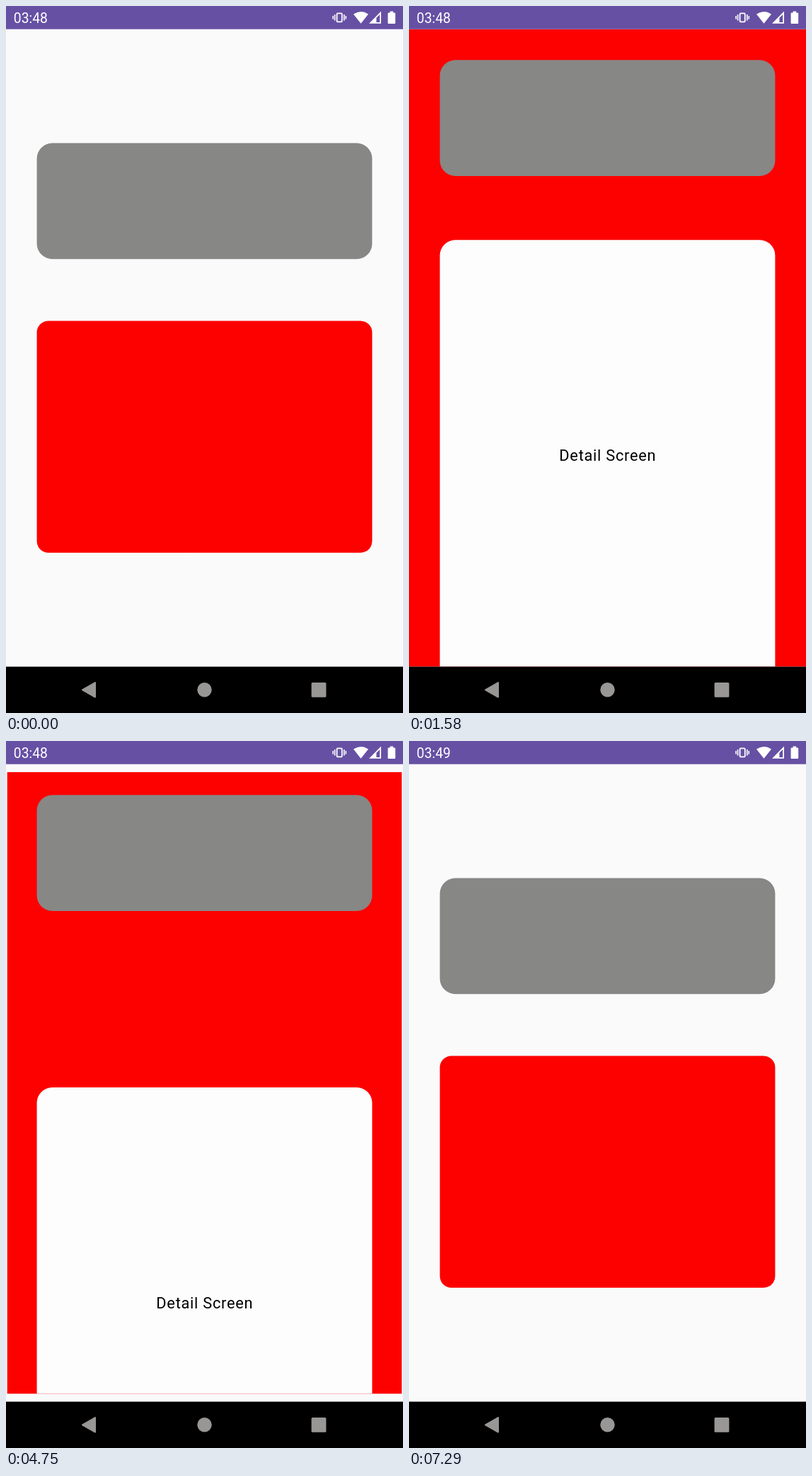
Animation, 561 px wide and 998 px high, one loop 7.71 s. Source, as an HTML page:

```html
<!DOCTYPE html>
<html lang="en">
<head>
<meta charset="utf-8">
<title>Card to detail transition</title>
<style>
  html, body { margin: 0; width: 100%; height: 100%; overflow: hidden; background: #fafafb; }
  svg { display: block; width: 100%; height: 100%; }
  text { font-family: Roboto, sans-serif; }
</style>
</head>
<body>
<svg viewBox="0 0 561 998">
  <defs>
    <clipPath id="cardClip"><rect id="clipBox"/></clipPath>
  </defs>
  <rect width="561" height="998" fill="#fafafb"/>
  <rect id="card" fill="#fd0000"/>
  <g clip-path="url(#cardClip)">
    <g id="panel">
      <rect x="43.6" width="473.8" height="640" rx="21.8" fill="#fdfdfd"/>
      <text x="280.8" y="311.8" font-size="21.8" letter-spacing=".72" text-anchor="middle">Detail Screen</text>
    </g>
  </g>
  <rect id="header" x="43.6" width="473.8" height="163.6" rx="21.8" fill="#878785"/>

  <rect width="561" height="32.7" fill="#6650a4"/>
  <g fill="#fff">
    <text id="clock" x="10.8" y="24" font-size="19.3">03:48</text>
    <rect x="467.6" y="10.4" width="7.2" height="11.9" rx="1" fill="none" stroke="#fff" stroke-width="1.8"/>
    <path d="M464.6 12v8.6M462.1 14v4.6M477.8 12v8.6M480.3 14v4.6" stroke="#fff" stroke-width="1.6"/>
    <path d="M491 11.6Q501.5 4.4 512 11.6L501.5 24.7Z"/>
    <path d="M530 7.6V24.7H513Z"/>
    <path d="M528.2 12V23H523.4V16.8Z" fill="#6650a4"/>
    <path d="M542.6 7.4h4.6v2h2q1 0 1 1v13.5q0 1-1 1h-8.600q-1 0-1-1v-13.500q0-1 1-1h2Z"/>
  </g>

  <rect y="932.6" width="561" height="65.4"/>
  <g fill="#999795">
    <path d="M108 965.3L126 955V975.6Z" stroke="#999795" stroke-width="2" stroke-linejoin="round"/>
    <circle cx="280.5" cy="965.3" r="10.2"/>
    <rect x="431.6" y="955" width="20.8" height="20.8" rx="1.6"/>
  </g>
</svg>
<script>
const LOOP = 7710, CLOCK_TICK = 6640;
const W = 561, TOP = 32.7, BOTTOM = 932.6, FULL = BOTTOM - TOP, MID = (TOP + BOTTOM) / 2;
const PAD = 43.6, HEADER = 163.6, GAP = 87.3, CARD_W = W - 2 * PAD, CARD_H = 327.3;
const MAX_H = FULL - 2 * PAD - HEADER - GAP;
const PANEL_Y = TOP + PAD + HEADER + GAP;

// at: screen switches, go: springs start
const steps = [
  { at: 0, go: -2000, open: false },
  { at: 1170, go: 1210, open: true },
  { at: 3000, go: 3060, open: false },
  { at: 4580, go: 4621, open: true },
  { at: 6460, go: 6490, open: false }
];

const $ = id => document.getElementById(id);
const [card, clipBox, panel, header, clock] = ['card', 'clipBox', 'panel', 'header', 'clock'].map($);

// Share still to travel on a critically damped spring
function left(ms, stiffness) {
  const u = Math.sqrt(stiffness) * Math.max(0, ms) / 1000;
  return (1 + u) * Math.exp(-u);
}

const mix = (a, b, p) => a + (b - a) * p;

function place(el, x, y, width, height, rx) {
  for (const [k, v] of Object.entries({ x, y, width, height, rx })) el.setAttribute(k, v);
}

function draw(t) {
  const step = steps.filter(s => s.at <= t).pop();
  const ms = t - step.go;
  const rest = left(ms, 1500);
  let headerY = TOP + PAD;
  if (step.open) {
    const w = mix(W, CARD_W, rest), h = mix(FULL, CARD_H, rest);
    const box = [(W - w) / 2, MID - h / 2, w, h, 0];
    place(card, ...box);
    place(clipBox, ...box);
    panel.setAttribute('transform', `translate(0 ${mix(PANEL_Y, BOTTOM, left(ms, 400))})`);
  } else {
    const h = Math.min(MAX_H, mix(CARD_H, FULL, rest));
    headerY = MID - (HEADER + GAP + h) / 2;
    place(card, PAD, headerY + HEADER + GAP, CARD_W, h, 16.4);
  }
  panel.setAttribute('visibility', step.open ? 'visible' : 'hidden');
  header.setAttribute('y', headerY);
  clock.textContent = t < CLOCK_TICK ? '03:48' : '03:49';
}

const start = performance.now();
function tick() {
  draw((performance.now() - start) % LOOP);
  requestAnimationFrame(tick);
}
tick();
</script>
</body>
</html>
```
